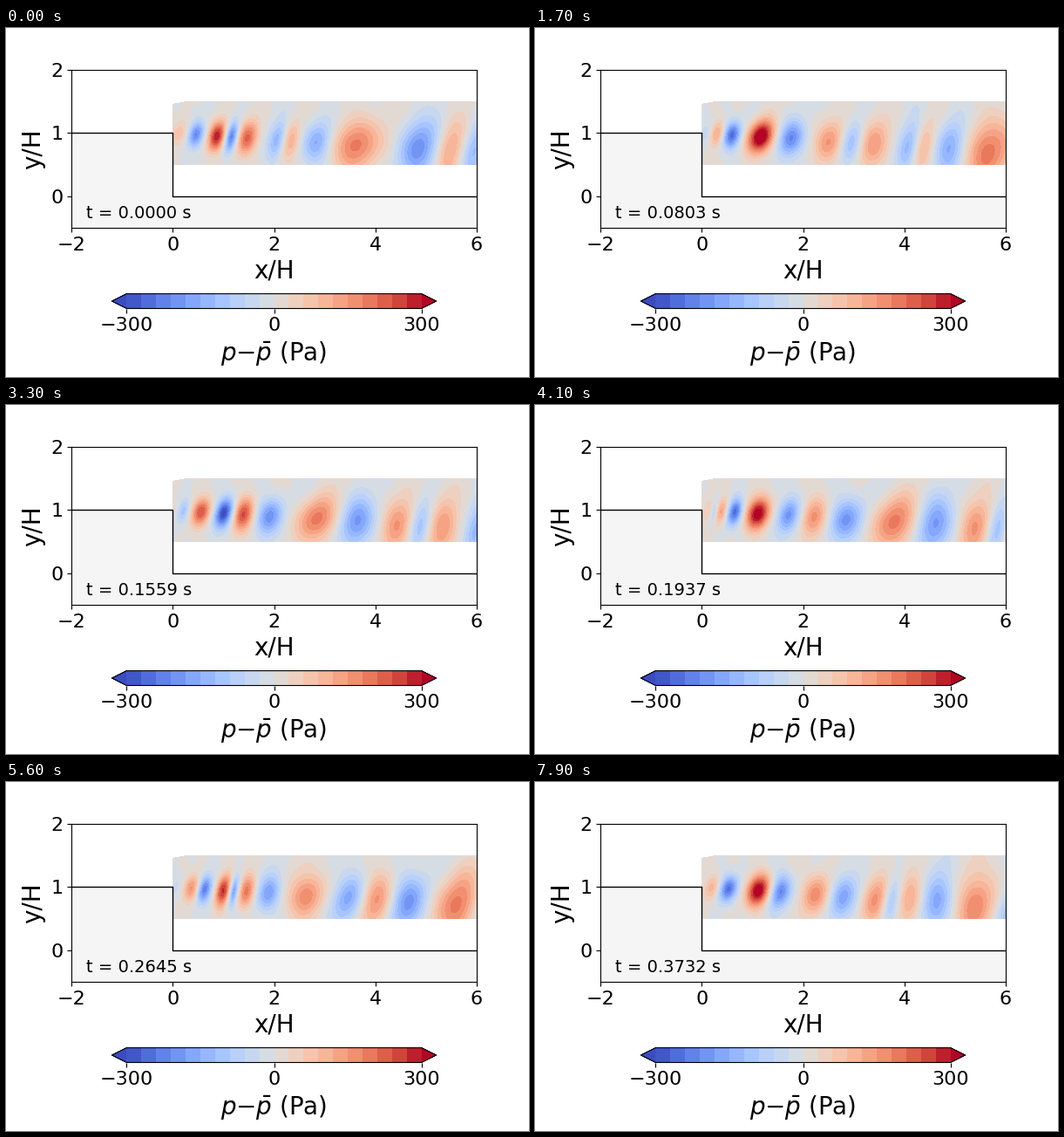
A matplotlib script that plays this animation: 600 by 400 pixels, repeating every 8 s.

```python
import numpy as np
import matplotlib.pyplot as plt
from matplotlib.animation import FuncAnimation

FRAMES, INTERVAL = 80, 100
TIME_STEP = 0.004724
W, H = 600, 400
LEVELS = np.linspace(-300, 300, 21)

# Eddy speed per frame: it rises linearly behind the step up to a limit.
START_SPEED, SPEED_GAIN, TOP_SPEED = 0.04, 0.035, 0.12
TOP_X = (TOP_SPEED - START_SPEED) / SPEED_GAIN
TOP_AGE = np.log(TOP_SPEED / START_SPEED) / SPEED_GAIN

# Frames at which eddies leave the step: low and high pressure in turn.
RELEASES = np.array([-62, -58, -53, -42.5, -36, -31.7, -29.5, -23.7, -20, -16.3,
                     -9.7, -3, 5, 10.3, 15, 21.5, 28, 32.5, 35.5, 38,
                     43.5, 48, 54.5, 59.5, 68, 74.4])
SIGNS = np.where(np.arange(len(RELEASES)) % 2, 1, -1)
gaps = np.gradient(RELEASES)
SPREAD = gaps / gaps.mean()

# Measured part of the flow; its upper left corner is slightly cut.
gx, v = np.meshgrid(np.linspace(0, 6, 301), np.linspace(0, 1, 81))
gy = 0.5 + v * (1 - 0.045 * np.clip(1 - gx / 0.3, 0, 1))


def position(age):
    """Distance from the step after some frames."""
    near = START_SPEED / SPEED_GAIN * np.expm1(SPEED_GAIN * min(age, TOP_AGE))
    return near + TOP_SPEED * max(age - TOP_AGE, 0)


def travel_time(x):
    near = np.log1p(SPEED_GAIN / START_SPEED * np.minimum(x, TOP_X)) / SPEED_GAIN
    return near + np.maximum(x - TOP_X, 0) / TOP_SPEED


def strength(x):
    """Eddies roll up quickly, peak one step height downstream, then relax."""
    return 165 * (1 - np.exp(-x / 0.3)) + 160 * np.exp(-((x - 1) / 0.55) ** 2)


def eddy(age, sign, spread):
    """Leaning Gaussian; widely spaced eddies are broader and stronger."""
    x = position(age)
    width = min(0.08 + 0.045 * x, 0.22) * spread ** 0.8
    height = 0.13 + 0.04 * x
    dy = gy - (1 - 0.05 * x)
    dx = gx - x - 0.25 * dy
    peak = sign * strength(x) * min(spread ** 0.5, 1.2)
    return peak * np.exp(-0.5 * ((dx / width) ** 2 + (dy / height) ** 2))


rng = np.random.default_rng(4)
ripples = [(rng.uniform(0.4, 0.9), rng.uniform(-8, 8), rng.uniform(0, 2 * np.pi))
           for _ in range(5)]
grid_age = travel_time(gx)


def turbulence(i):
    """Fine unevenness carried along with the eddies."""
    waves = sum(np.sin(k * (i - grid_age) + m * gy + phase) for k, m, phase in ripples)
    return 6 * np.tanh(gx) * waves


def pressure(i):
    total = turbulence(i)
    for release, sign, spread in zip(RELEASES, SIGNS, SPREAD):
        if release < i:
            total += eddy(i - release, sign, spread)
    return total


plt.rcParams.update({"font.family": "DejaVu Sans", "xtick.labelsize": 16,
                     "ytick.labelsize": 16, "axes.labelsize": 20})
fig = plt.figure(figsize=(W / 100, H / 100), dpi=100)
ax = fig.add_axes([75 / W, 170.75 / H, 465 / W, 181.35 / H])
cax = fig.add_axes([121.5 / W, 78.5 / H, 372 / W, 16.9 / H])

ax.set(xlim=(-2, 6), ylim=(-0.5, 2), xlabel="x/H", ylabel="y/H",
       xticks=[-2, 0, 2, 4, 6], yticks=[0, 1, 2])
ax.fill([-2, 0, 0, 6, 6, -2], [1, 1, 0, 0, -0.5, -0.5], facecolor="whitesmoke")
ax.plot([-2, 0, 0, 6], [1, 1, 0, 0], color="black", lw=1)
clock = ax.text(-1.7, -0.35, "", fontsize=14)


def draw_field(i):
    return ax.contourf(gx, gy, pressure(i), levels=LEVELS, cmap="coolwarm", extend="both")


field = draw_field(0)
bar = fig.colorbar(field, cax=cax, orientation="horizontal", ticks=[-300, 0, 300])
bar.minorticks_off()
bar.set_label(r"$p{-}\bar{p}$ (Pa)")


def update(i):
    global field
    field.remove()
    field = draw_field(i)
    clock.set_text(f"t = {i * TIME_STEP:.4f} s")
    return field, clock


anim = FuncAnimation(fig, update, frames=FRAMES, interval=INTERVAL,
                     init_func=lambda: (), repeat=True, repeat_delay=0)
plt.show()
```
